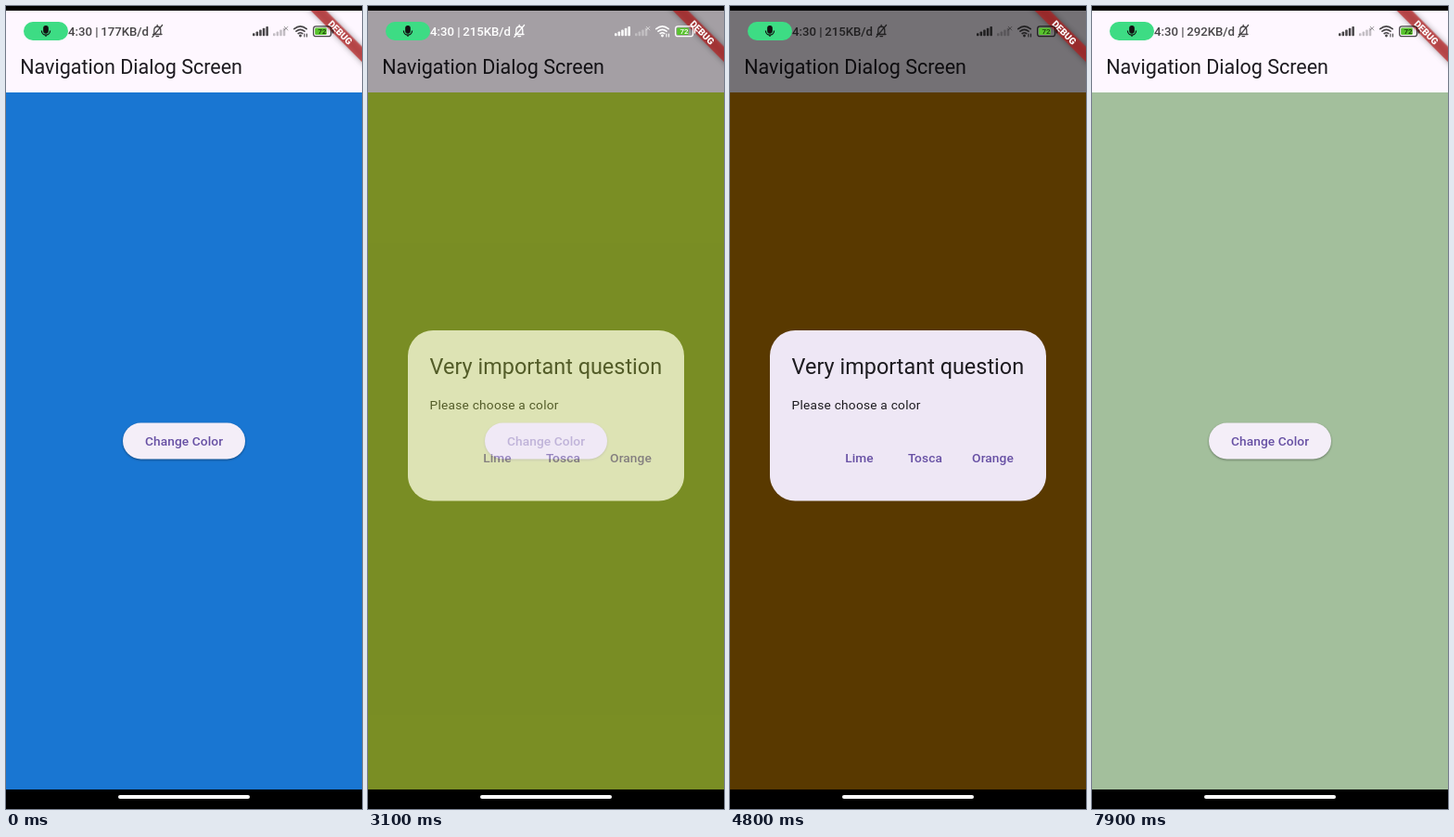
Write an HTML page that moves like this. It is 384 by 864 pixels and loops after 8000 ms.

```html
<!DOCTYPE html>
<html lang="en">
<head>
<meta charset="utf-8">
<title>Navigation Dialog Screen</title>
<style>
  html, body { margin: 0; width: 100%; height: 100%; overflow: hidden; background: #000; }
  svg { display: block; width: 384px; height: 864px; }
  text { font-family: Roboto, "Noto Sans", sans-serif; }
  .label { font-size: 13.7px; font-weight: 500; letter-spacing: .1px; fill: #6750a4; text-anchor: middle; }
  .ink { fill: #1d1b20; }
  #button { filter: drop-shadow(0 1px 1px rgba(0, 0, 0, .38)); }
  #ribbon { filter: drop-shadow(0 0 3px rgba(0, 0, 0, .5)); }
  #status { fill: currentColor; }
  .line { fill: none; stroke: currentColor; stroke-linecap: round; }
</style>
</head>
<body>
<svg viewBox="0 0 384 864">
  <defs>
    <clipPath id="pill"><rect x="126" y="448.4" width="132" height="39.2" rx="19.6"/></clipPath>
    <clipPath id="app"><rect y="5" width="384" height="838"/></clipPath>
  </defs>
  <rect width="384" height="864"/>
  <rect id="page" y="93" width="384" height="750"/>
  <rect y="5" width="384" height="88" fill="#fef7ff"/>
  <text class="ink" x="15.2" y="73" font-size="21.5">Navigation Dialog Screen</text>

  <rect id="button" x="126" y="448.4" width="132" height="39.2" rx="19.6" fill="#f4eef8"/>
  <circle id="ripple" cx="195" cy="478" fill="#6750a4" clip-path="url(#pill)"/>
  <text class="label" x="192" y="473">Change Color</text>

  <g id="overlay">
    <rect y="5" width="384" height="838" fill="#000" fill-opacity=".54"/>
    <rect x="43" y="349" width="298" height="183.5" rx="27.4" fill="#eee7f5"/>
    <text class="ink" x="66.6" y="396" font-size="23.45">Very important question</text>
    <text class="ink" x="66.6" y="434" font-size="13.7" letter-spacing=".24">Please choose a color</text>
    <text class="label" x="139.5" y="491">Lime</text>
    <text class="label" x="210.5" y="491">Tosca</text>
    <text class="label" x="283.5" y="491">Orange</text>
  </g>

  <g clip-path="url(#app)">
    <g transform="translate(384 5) rotate(45)">
      <rect id="ribbon" x="-60" y="27.4" width="120" height="11.7" fill="#b71c1c" fill-opacity=".7"/>
      <text y="36.8" font-size="10" font-weight="900" fill="#fff" text-anchor="middle">DEBUG</text>
    </g>
  </g>

  <rect x="19" y="17" width="48" height="20" rx="10" fill="#3ddc84"/>
  <g fill="none" stroke="#111" stroke-width="1.2">
    <rect x="40.8" y="21.6" width="4.4" height="7.6" rx="2.2" fill="#111"/>
    <path d="M38.4 26.5a4.6 4.6 0 0 0 9.2 0M43 31v2"/>
  </g>
  <g id="status">
    <text x="67" y="32" font-size="13.2" font-weight="500">4:30 |</text>
    <text id="usage" x="154" y="32" font-size="13.2" font-weight="500" text-anchor="end"></text>
    <path class="line" stroke-width="1.3" d="M158.6 30.5h9.4M159.8 30v-4q0-3.4 3.4-4q3.6.6 3.6 4v4M162 32.6h2.6M163.2 20.5v1M168.6 20.5l-10.8 12.8"/>
    <g id="bars"></g>
    <g id="weakBars" opacity=".32"></g>
    <path d="M300.2 22.2l3.8 3.8M304 22.2l-3.8 3.8" class="line" stroke-width="1" opacity=".5"/>
    <path class="line" stroke-width="1.7" d="M310.8 24.6q6.7-5.6 13.4 0M313 27.2q4.5-3.6 9 0M315.2 29.6q2.3-1.7 4.6 0"/>
    <circle cx="317.5" cy="32" r="1.4"/>
    <path class="line" stroke-width="1.1" d="M322 30v3M324.5 30v3"/>
    <rect x="333.2" y="23.6" width="12.6" height="7.4" rx="1.2" fill="#58c32d"/>
    <rect class="line" x="331.6" y="21.9" width="19" height="10.8" rx="2.8" stroke-width="1.2"/>
    <rect x="351.8" y="25" width="1.5" height="4.6" rx=".7"/>
    <text x="341" y="30.2" font-size="8" font-weight="500" text-anchor="middle">72</text>
  </g>
  <rect x="121" y="849" width="142" height="4" rx="2" fill="#fff"/>
</svg>
<script>
const LOOP = 8000;
const BLUE = '#1976d2', LIME = '#bddc38', TOSCA = '#a3bf9c', ORANGE = '#c27c00';

// press: button tapped, open: dialog appears, pick: choice made
const visits = [
  { press: 80, open: 200, pick: 750, color: LIME },
  { press: 1180, open: 1300, pick: 1930, color: TOSCA },
  { press: 2420, open: 2520, pick: 3050, color: LIME },
  { press: 3488, open: 3620, pick: 4200, color: ORANGE },
  { press: 4480, open: 4600, pick: 5540, color: ORANGE },
  { press: 5920, open: 6000, pick: 6460, color: LIME },
  { press: 6840, open: 6950, pick: 7430, color: TOSCA }
];
const usageSteps = [[0, '177KB/d'], [3000, '215KB/d'], [7200, '292KB/d']];

const $ = id => document.getElementById(id);
const ramp = (t, from, length) => Math.min(1, Math.max(0, (t - from) / length));
const easeOut = k => 1 - (1 - k) ** 2;

function addBars(id, x, count) {
  for (let i = 0; i < count; i++) {
    const h = 3 + i * 1.8;
    $(id).insertAdjacentHTML('beforeend',
      `<rect x="${x + i * 3.6}" y="${32.2 - h}" width="2.5" height="${h}" rx=".8"/>`);
  }
}
addBars('bars', 266, 5);
addBars('weakBars', 288, 4);

function draw(t) {
  let color = BLUE, shown = 0, light = 0, radius = 0, tint = 0;
  for (const { press, open, pick, color: next } of visits) {
    if (t >= pick) color = next;
    shown += easeOut(ramp(t, open, 150)) * (1 - ramp(t, pick, 150));
    light += ramp(t, open + 250, 250) - ramp(t, pick + 100, 350);
    if (t >= press && t < pick) {
      radius = 80 * ramp(t, press, 250);
      tint = .1 * (1 - ramp(t, open, 250));
    }
  }
  $('page').setAttribute('fill', color);
  $('overlay').setAttribute('opacity', shown);
  $('ripple').setAttribute('r', radius);
  $('ripple').setAttribute('opacity', tint);
  const v = Math.round(255 * light);
  $('status').style.color = `rgba(${v}, ${v}, ${v}, ${.72 + .28 * light})`;
  $('usage').textContent = usageSteps.filter(([at]) => t >= at).pop()[1];
}

const start = performance.now();
function tick() {
  draw((performance.now() - start) % LOOP);
  requestAnimationFrame(tick);
}
tick();
</script>
</body>
</html>
```
